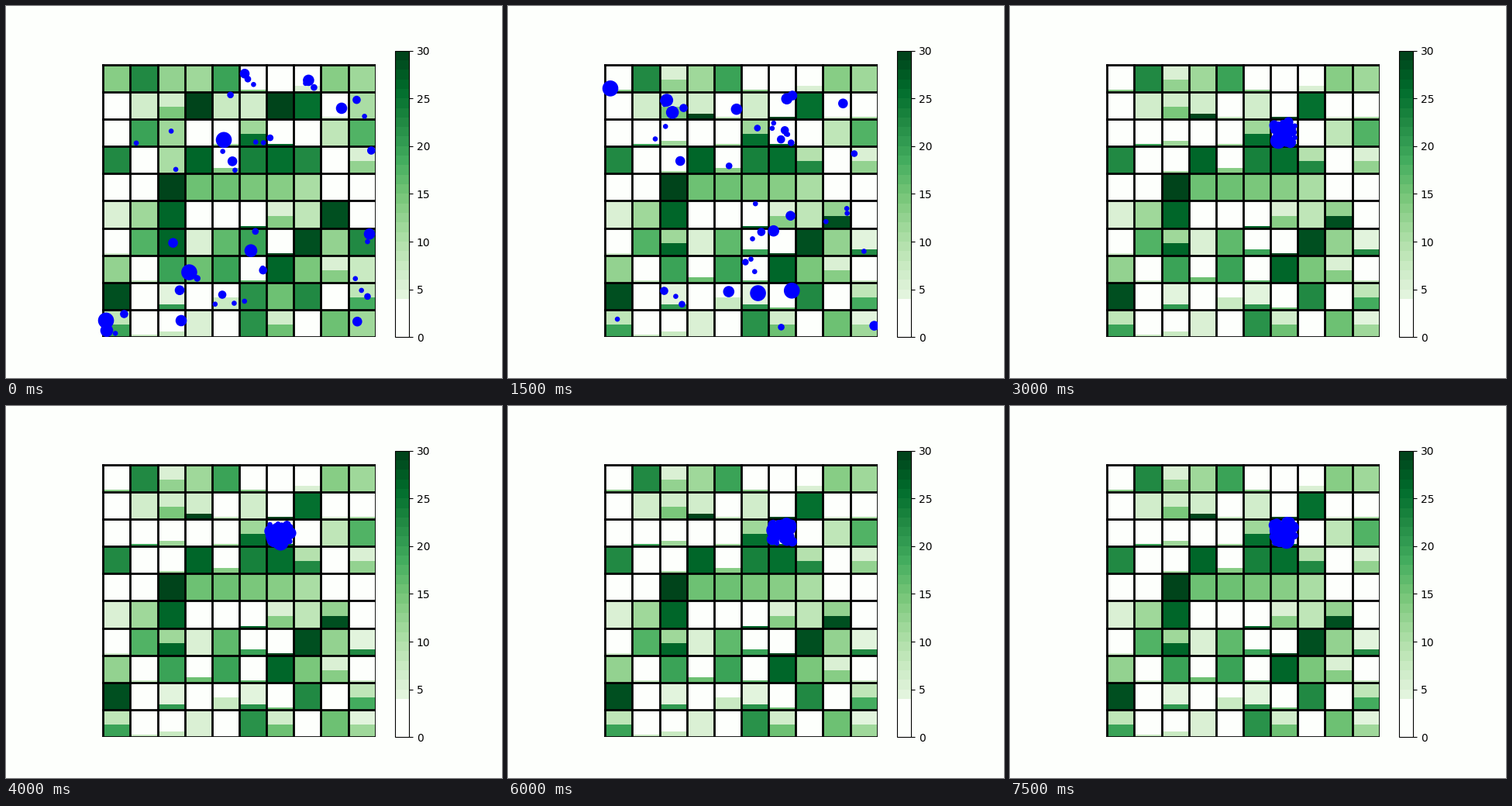
These frames come from a looping animation (640 px wide and 480 px high, 8000 ms). A matplotlib script:

```python
import matplotlib.pyplot as plt
import numpy as np
from matplotlib.animation import FuncAnimation
from matplotlib.cm import ScalarMappable
from matplotlib.colors import ListedColormap, Normalize, to_rgba
from matplotlib.patches import Rectangle

W, H, DPI = 640, 480, 100
N = 10                  # cells per side
CELL = 35.156           # cell size in pixels
PAPER = "#fdfffc"
MAX_FOOD = 30
HOME = np.array([6, 2])  # column and row where the balls gather
GATHERED = [0, .1, .2]   # share of balls at home in the first steps


def nibbled(food):
    return food, .45


def cropped(food):
    return food, .21


def stripped(food):
    return food, .08


n, c, s = nibbled, cropped, stripped

# Food each cell can hold, marked by how far it gets grazed.
FIELD = [
    [s(13), 22, n(12), 11, 19, s(13), 0, c(5), 13, 11],
    [0, 6, n(14), c(30), s(7), 6, s(30), 25, s(5), s(10)],
    [0, s(19), c(11), 0, s(11), n(25), s(26), 0, 8, 17],
    [22, 0, s(10), 26, c(13), 23, 25, n(22), 0, n(12)],
    [0, 0, 30, 15, 15, 14, 13, 10, 0, 0],
    [5, 11, 26, 0, 0, s(26), n(13), 8, n(28), 0],
    [s(6), 17, n(26), 5, 16, c(19), s(30), 28, 12, c(22)],
    [12, s(7), 19, c(15), 19, s(16), 26, 14, n(13), s(7)],
    [28, 0, c(20), 0, n(7), c(21), s(15), 22, 0, n(18)],
    [n(19), s(7), c(7), 5, 0, 21, n(15), 0, 15, n(11)],
]

cells = [[v if isinstance(v, tuple) else (v, 1) for v in row] for row in FIELD]
capacity, final_level = np.moveaxis(np.array(cells, float), -1, 0)
grazed = np.argwhere(final_level < 1)[:, ::-1]
grazed_early = np.random.default_rng(4).random((N, N)) < .55

radii = np.repeat([3, 4, 5, 6, 7, 8, 10], [18, 7, 5, 5, 4, 2, 3])


def food_levels(step):
    return np.where(grazed_early | (step > 0), final_level, 1)


def ball_centres(step):
    """Balls wander over grazed cells, then mill about in the home cell."""
    rng = np.random.default_rng(step)
    share = GATHERED[step] if step < len(GATHERED) else 1
    at_home = rng.random(radii.size) < share
    corner = np.where(at_home[:, None], HOME, rng.choice(grazed, radii.size))
    return corner + rng.uniform(.1, .9, (radii.size, 2))


greens = plt.get_cmap("Greens", MAX_FOOD)(np.arange(MAX_FOOD))
greens[:4] = to_rgba(PAPER)
cmap = ListedColormap(greens)
norm = Normalize(0, MAX_FOOD)


def shade(food):
    return cmap(norm(food))


fig = plt.figure(figsize=(W / DPI, H / DPI), dpi=DPI, facecolor=PAPER)
ax = fig.add_axes([.125, .11, .62, .77])
ax.set(xlim=(N - .62 * W / CELL, N), ylim=(N, N - .77 * H / CELL))
ax.axis("off")
cax = fig.add_axes([501.6 / W, .11, 18.48 / W, .77])
fig.colorbar(ScalarMappable(norm, cmap), cax=cax)

patches = {}
for row, col in np.ndindex(N, N):
    back = Rectangle((col, row), 1, 1, lw=0)
    stock = Rectangle((col, row + 1), 1, -1, lw=0,
                      fc=shade(capacity[row, col]))
    patches[row, col] = ax.add_patch(back), ax.add_patch(stock)

for k in range(N + 1):
    ax.plot([k, k], [0, N], "k", lw=2)
    ax.plot([0, N], [k, k], "k", lw=2)

sizes = ((2 * radii + .6) * 72 / DPI) ** 2
balls = ax.scatter(*np.zeros((2, radii.size)), s=sizes, color="blue", lw=0,
                   zorder=3)


def draw(frame):
    step = max(frame - 1, 0)  # the opening picture holds twice as long
    levels = food_levels(step)
    for cell, (back, stock) in patches.items():
        back.set_facecolor(shade(capacity[cell] * levels[cell]))
        stock.set_height(-levels[cell])
    balls.set_offsets(ball_centres(step))
    return [balls]


anim = FuncAnimation(fig, draw, frames=16, interval=500, repeat=True,
                     repeat_delay=0)
plt.show()
```
